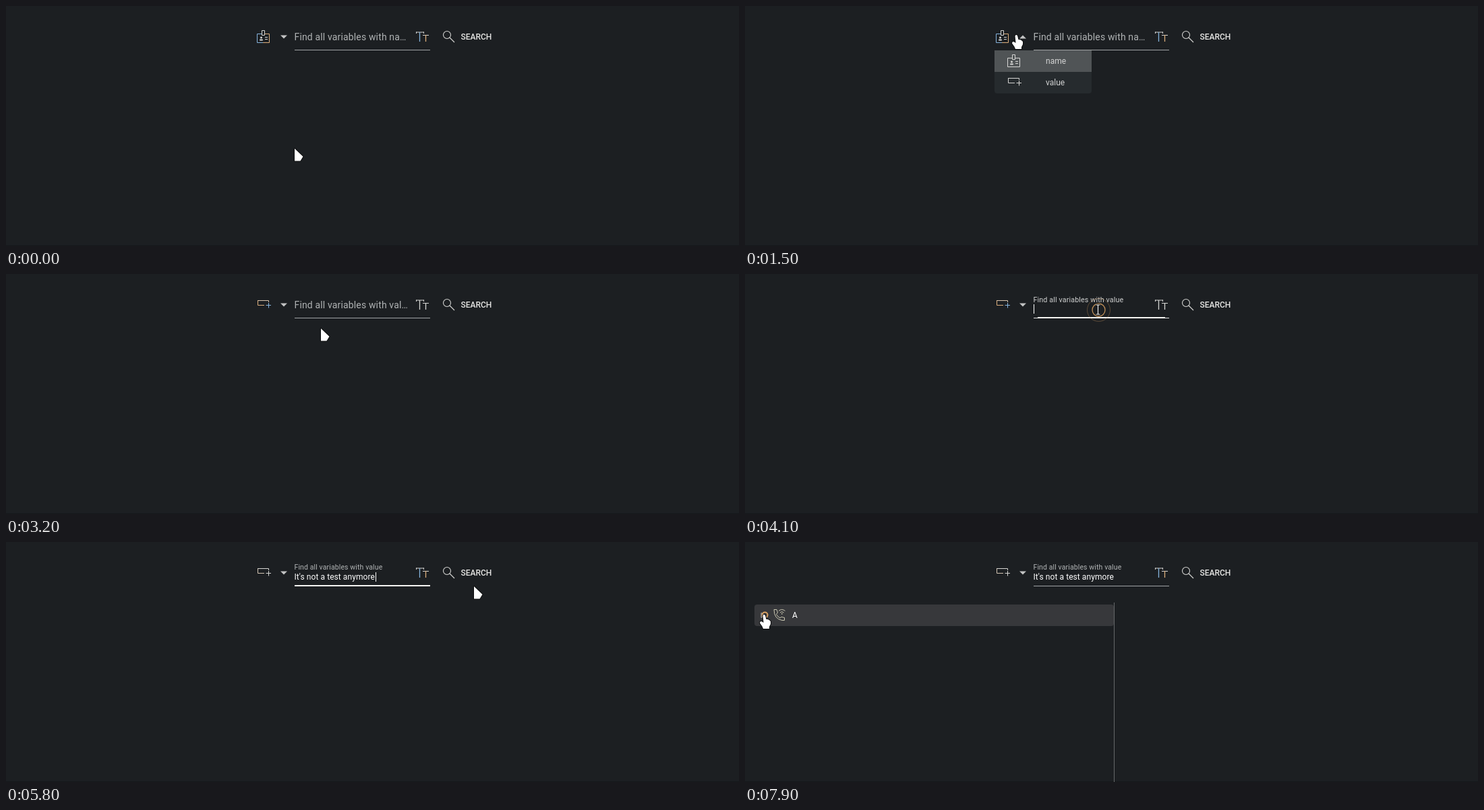
An HTML page with a canvas for the animation above (8 s loop, 1087 by 357 pixels).

```html
<!DOCTYPE html>
<html lang="en">
<head>
<meta charset="utf-8">
<title>Variable search</title>
<style>
html, body { margin: 0; width: 1087px; height: 357px; overflow: hidden; background: #1c1f22; }
canvas { display: block; }
</style>
</head>
<body>
<canvas id="stage" width="1087" height="357"></canvas>
<script>
const c = document.getElementById('stage').getContext('2d');
const LIGHT = '#d6d6d4', BLUE = '#86b4de', ORANGE = '#dcae7c';

// Pointer tip: time, x, y
const track = [
  [100, 428, 212], [300, 433, 198], [600, 424, 110], [800, 399, 50], [900, 402, 43],
  [1800, 402, 43], [2000, 420, 85], [2200, 437, 115],
  [2900, 437, 115], [3100, 450, 95], [3300, 484, 67], [3600, 523, 53],
  [5300, 523, 53], [5600, 640, 86], [5800, 694, 66], [6000, 690, 60],
  [7200, 690, 60], [7300, 660, 66], [7500, 330, 95], [7700, 60, 108], [7800, 28, 108]
];
const clicks = [1100, 2500, 3900, 6400, 7900];

const within = (v, a, b) => v >= a && v <= b;
const ramp = (t, a, b) => Math.min(1, Math.max(0, (t - a) / (b - a)));
const ease = p => p * p * (3 - 2 * p);

function pointerAt(t) {
  const i = track.findIndex(k => k[0] >= t);
  if (i === 0) return track[0].slice(1);
  if (i < 0) return track.at(-1).slice(1);
  const [t0, x0, y0] = track[i - 1], [t1, x1, y1] = track[i];
  const p = (t - t0) / (t1 - t0);
  return [x0 + (x1 - x0) * p, y0 + (y1 - y0) * p];
}

function text(s, x, y, color, size = 12, weight = 400, spacing = 0) {
  c.font = `${weight} ${size}px Roboto, sans-serif`;
  c.letterSpacing = spacing + 'px';
  c.fillStyle = color;
  c.fillText(s, x, y);
}

function line(d, color, width = 1) {
  c.strokeStyle = color;
  c.lineWidth = width;
  c.stroke(new Path2D(d));
}

function box(x, y, w, h, color, radius = 0) {
  c.fillStyle = color;
  c.beginPath();
  c.roundRect(x, y, w, h, radius);
  c.fill();
}

function at(x, y, draw) {
  c.save();
  c.translate(x, y);
  draw();
  c.restore();
}

function badge(left, right) {
  line('M7 5.5H.5V18.5H9', left);
  line('M11 5.5H18.5V18.5H9', right);
  line('M7.5 7.5V.5H11.5V7.5Z M12 10.5H16 M12 13.5H16', LIGHT);
  box(5, 9.5, 3, 3, LIGHT, 1.5);
  box(4, 13.5, 5, 2, LIGHT, 1);
}

function valueIcon(frame, top, plus) {
  line('M.5 0V7.5H10', frame);
  line('M.5 .5H16.5V3', top);
  line('M12.5 7.5H20 M16.5 4V11.5', plus);
}

function menu(t, py) {
  const shown = ease(ramp(t, 1100, 1300)) * (1 - ramp(t, 2600, 2800));
  if (!shown) return;
  const opening = t < 2000 ? .8 + .2 * shown : 1;
  at(370, 66, () => {
    c.globalAlpha = shown;
    c.scale(opening, opening);
    box(0, 0, 144, 64, '#262b2e', [0, 0, 4, 4]);
    const onValue = py > 98;
    box(0, onValue ? 32 : 0, 144, 32, t < 2500 ? '#505456' : '#474c4e', onValue ? [0, 0, 4, 4] : 0);
    at(19, 6, () => badge(LIGHT, LIGHT));
    at(20, 41, () => valueIcon(LIGHT, LIGHT, LIGHT));
    text('name', 76, 20, '#d2d3d3');
    text('value', 76, 52, '#d2d3d3');
  });
}

function field(t, hover, grey) {
  const focus = t < 6400 ? ramp(t, 3900, 4090) : 0;
  const float = t < 4200 ? [0, .5, .93][Math.max(0, (t - 3900) / 100)] || 0 : 1;
  const name = t < 2600;
  const label = 'Find all variables with ' + (float ? 'value' : name ? 'na…' : 'val…');
  at(427.5, 51 - 10 * float, () => {
    const s = 1 - .25 * float;
    c.scale(s, s);
    text(label, 0, 0, grey && float ? '#cfd0d0' : '#b0b3b4', 14, 400, .15);
  });
  box(428, 65, 201, 1, hover || focus ? '#e4e4e4' : '#a1a4a5');
  if (focus) {
    const w = 201 * (t < 4000 ? 0 : t < 4100 ? .45 : t < 4200 ? .94 : 1);
    box(528.5 - w / 2, 64, w, 2, '#f4f4f2');
  }
  const typed = t >= 4900;
  if (typed) text("It's not a test anymore", 427.5, 56, '#fff', 12, 400, .07);
  if (t >= 4000 && t < 6400) box(typed ? 548 : 428, 45, 1, 14, '#fff');
}

function toolbar(t, grey, overButton) {
  at(372, 36, () => {
    if (t < 2600) badge(grey ? LIGHT : BLUE, grey ? LIGHT : ORANGE);
    else at(1, 3, () => grey ? valueIcon(ORANGE, '#d8c5ae', BLUE) : valueIcon('#d4c6b4', LIGHT, LIGHT));
  });

  const closing = [180, 135, 50][Math.max(0, (t - 2500) / 100)] ?? 0;
  const angle = t < 2500 ? 180 * ease(ramp(t, 1100, 1300)) : closing;
  at(412, 46, () => {
    c.rotate(angle * Math.PI / 180);
    c.fillStyle = '#c3c4c4';
    c.fill(new Path2D('M-5 -2.5H5L0 2.5Z'));
  });

  line('M608 39H620 M608.5 38.5V41 M619.5 38.5V41', LIGHT);
  line('M613.5 39V53', grey ? LIGHT : BLUE, 1.3);
  line('M618 43.5H627', LIGHT);
  line('M622.5 43V53', grey ? LIGHT : ORANGE, 1.3);

  if (overButton) box(641, 26, 83, 40, '#37393c', 3);
  line('M648.5 43a5.5 5.5 0 1 0 11 0a5.5 5.5 0 1 0 -11 0 M658 47L665 54', LIGHT, 1.1);
  text('SEARCH', 674.5, 50, '#e6e6e4', 12, 500);
}

function results(t, hover) {
  if (t < 6700) return;
  if (hover) box(14, 93, 533, 32, '#37383b', 4);
  box(547, 90, 1, 267, '#65686a');
  line('M24 105.5L30 109L24 112.5Z', '#b9babb');
  line('M43 100.5H47L48.5 105L46.5 107.5Q48.5 111.5 52 113L54 111.5L58.5 112.5V116.5H55Q43 114.5 43 100.5Z', '#cbc8b2');
  line('M50 102.5Q54.5 98.5 59.5 102.5 M52 105Q54.5 102.5 57.5 105', '#cbc8b2');
  box(54, 106, 1.5, 1.5, '#cbc8b2');
  text('A', 70, 113, '#fff');
}

function ring(x, y, r, alpha, width) {
  c.globalAlpha = alpha;
  c.strokeStyle = '#dba262';
  c.lineWidth = width;
  c.beginPath();
  c.arc(x, y, r, 0, 7);
  c.stroke();
  c.globalAlpha = 1;
}

function clickRings(t, x, y) {
  const start = clicks.find(k => within(t, k, k + 300));
  if (!start) return;
  const phase = (t - start) / 100;
  if (phase === 1) {
    box(x - 10, y - 10, 20, 20, '#41474a', 10);
    ring(x, y, 7, .3, 1);
  }
  ring(x, y, [4, 14.5, 17, 21][phase], [1, 1, .32, .1][phase], phase < 2 ? 2 : 1);
  if (phase) ring(x, y, [0, 11, 9.5, 13][phase], [0, 1, .85, .2][phase], phase < 2 ? 2 : 1.3);
}

const shapes = {
  arrow: 'M0 0L12.5 12L8.5 18.5H0Z',
  hand: 'M-1.5 1.5Q0 -1 2 1L3.5 7L6 7L8.5 8.5L10 10V14L8 18V21H-1L-2.5 17.5L-6 12.5L-5.5 10.5L-3.5 10L-.5 12Z'
};

function pointer(kind, x, y) {
  at(x, y, () => {
    if (kind === 'beam') {
      const beam = 'M-2.5 -7H3.5 M-2.5 7H3.5 M.5 -7V7';
      line(beam, '#0b0c0d', 3);
      line(beam, '#fff', 1.2);
      return;
    }
    c.lineJoin = 'round';
    line(shapes[kind], '#0b0c0d', 2);
    c.fillStyle = '#fff';
    c.fill(new Path2D(shapes[kind]));
  });
}

function draw(t) {
  const [x, y] = pointerAt(t);
  const grey = within(t, 1100, 1400) || within(t, 2500, 3200) || within(t, 3900, 4200);
  const overField = within(x, 428, 629) && within(y, 26, 65.9);
  const overButton = within(x, 641, 724) && within(y, 26, 65.9);
  const overRow = t >= 6700 && within(x, 14, 547) && within(y, 93, 125);
  const overMenu = within(t, 1200, 2800) && within(x, 370, 514) && within(y, 66, 130);
  const overIcon = x < 427 && y < 66;

  box(0, 0, 1087, 357, '#1c1f22');
  box(0, 356, 1087, 1, '#15181a');
  results(t, overRow);
  toolbar(t, grey, overButton);
  field(t, overField, grey);
  menu(t, y);
  clickRings(t, x + 1.5, y + .5);
  const hand = overButton || overMenu || overIcon || overRow;
  pointer(hand ? 'hand' : overField ? 'beam' : 'arrow', x, y);
}

function tick() {
  draw(Math.floor(performance.now() % 8000 / 100) * 100);
  requestAnimationFrame(tick);
}
tick();
</script>
</body>
</html>
```
